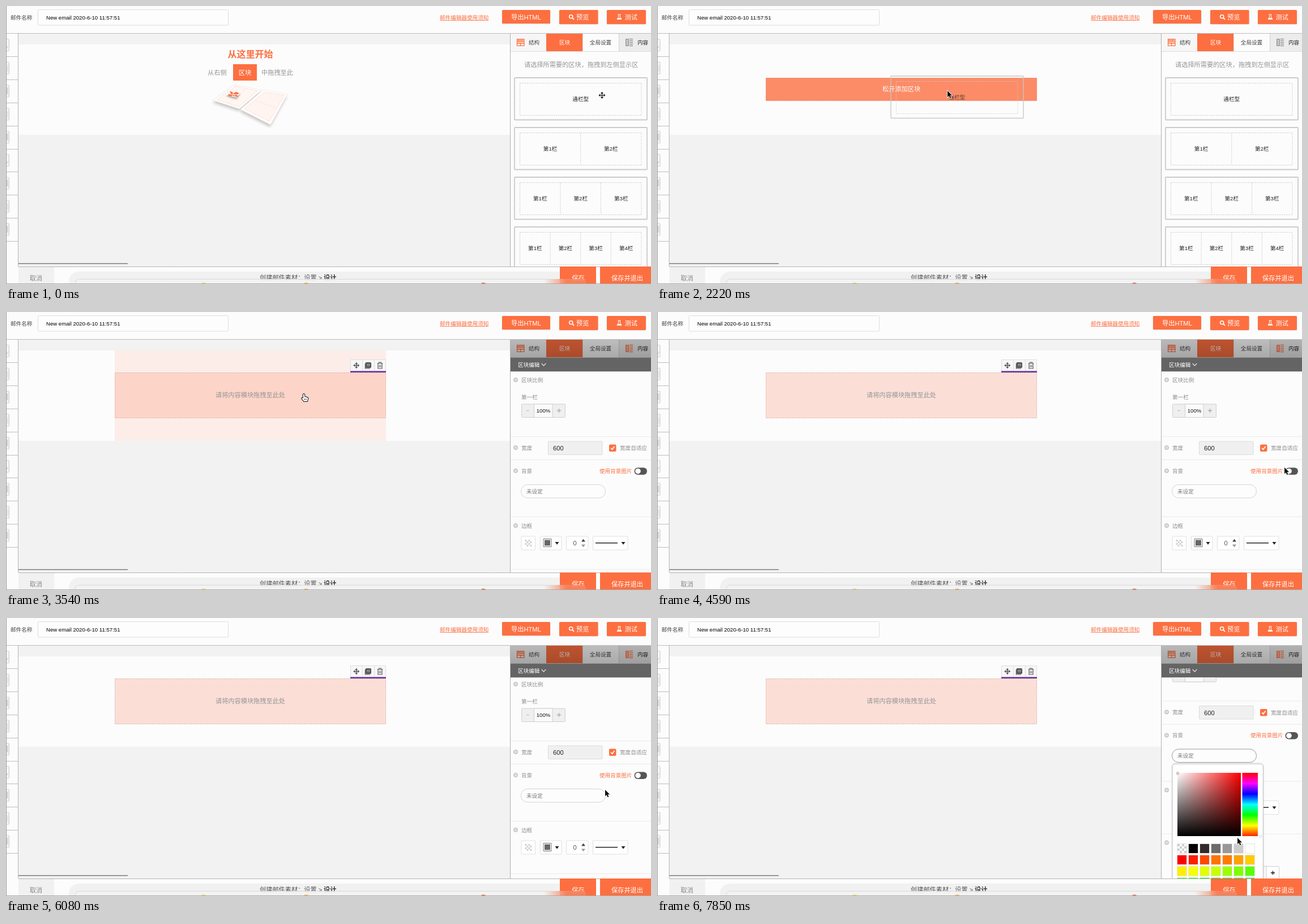
An HTML page with a canvas that plays this animation: 1139 px wide and 492 px high, repeating every 8 s.

```html
<!DOCTYPE html>
<html lang="zh-CN">
<head>
<meta charset="utf-8">
<title>邮件编辑器</title>
<style>
html, body { margin: 0; width: 100%; height: 100%; overflow: hidden; background: #f2f2f2; }
canvas { display: block; width: 1139px; height: 492px; }
</style>
</head>
<body>
<canvas id="stage" width="1139" height="492"></canvas>
<script>
const c = document.getElementById('stage').getContext('2d');
const LOOP = 8000, ORANGE = '#fd6f40', PAPER = '#fcfcfc', GREY = '#959595', FORM = '#8c8c8c';
const FONT = '"Liberation Sans", "Noto Sans CJK SC", "Noto Sans CJK", "Noto Sans CJK JP", sans-serif';

// ---- timing ----
// Number of picture changes passed out of n, spread evenly over a..b
const passed = (t, a, b, n) => Math.max(0, Math.min(n, Math.floor((t - a) / ((b - a) / (n - 1)) + 1e-6) + 1));

const MOVES = [
  { a: 140, b: 890, pts: [[1052, 158], [1042, 158], [1022, 159], [1000, 159], [980, 157], [967, 155], [962, 154]] },
  { a: 1180, b: 2220, pts: [[962, 154], [953, 156], [890, 159], [800, 160], [705, 160], [625, 157], [560, 153], [525, 151], [513, 150]] },
  { a: 2360, b: 2800, pts: [[513, 150], [516, 149], [521, 147], [525, 145], [526, 145]] },
  { a: 3990, b: 4890, pts: [[526, 145], [575, 160], [690, 185], [860, 215], [1000, 250], [1108, 275], [1085, 295], [1058, 304]] },
  { a: 7110, b: 7850, pts: [[1058, 304], [1040, 268], [1010, 245], [1010, 245], [1016, 300], [1023, 360], [1025, 389]] }
];

function pointer(t) {
  const m = MOVES.filter(m => t >= m.a).pop() || MOVES[0];
  return m.pts[passed(t, m.a, m.b, m.pts.length - 1)];
}

function scrollAt(t) {
  if (t < 5780) return [0, 8, 28, 39][passed(t, 5040, 5340, 3)];
  return [39, 27, 11, 3, 8, 25, 48, 67, 73.5][passed(t, 5780, 6820, 8)];
}

// ---- drawing helpers ----
function fill(x, y, w, h, color) { c.fillStyle = color; c.fillRect(x, y, w, h); }

function text(s, x, y, size, color, align = 'left', weight = 400) {
  c.font = `${weight} ${size}px ${FONT}`;
  c.textAlign = align;
  c.fillStyle = color;
  c.fillText(s, x, y + size * 0.37);
}

function line(x1, y1, x2, y2, color, w = 1, dash = []) {
  c.strokeStyle = color; c.lineWidth = w; c.setLineDash(dash);
  c.beginPath(); c.moveTo(x1, y1); c.lineTo(x2, y2); c.stroke();
  c.setLineDash([]);
}

function box(x, y, w, h, r, bg, border, lw = 1) {
  c.beginPath(); c.roundRect(x, y, w, h, r);
  if (bg) { c.fillStyle = bg; c.fill(); }
  if (border) { c.strokeStyle = border; c.lineWidth = lw; c.stroke(); }
}

function dashed(x, y, w, h, color) {
  c.setLineDash([2.4, 1.6]); box(x, y, w, h, 0, null, color); c.setLineDash([]);
}

function poly(pts, bg, border, lw = 1) {
  c.beginPath(); pts.forEach(p => c.lineTo(...p)); c.closePath();
  if (bg) { c.fillStyle = bg; c.fill(); }
  if (border) { c.strokeStyle = border; c.lineWidth = lw; c.stroke(); }
}

function shape(d, x, y, bg, border, lw = 1) {
  const p = new Path2D(d);
  c.save(); c.translate(x, y);
  if (border) { c.strokeStyle = border; c.lineWidth = lw; c.stroke(p); }
  if (bg) { c.fillStyle = bg; c.fill(p); }
  c.restore();
}

function caret(x, y, dir, color, s = 3.5) {
  poly([[x - s, y - dir * s * .6], [x + s, y - dir * s * .6], [x, y + dir * s * .8]], color);
}

function checker(x, y, s) {
  fill(x, y, s, s, '#fff');
  const q = s / 4;
  for (let i = 0; i < 16; i++) if ((i + (i >> 2)) % 2 === 0) fill(x + i % 4 * q, y + (i >> 2) * q, q, q, '#d0d0d0');
}

function clip(x, y, w, h, draw) {
  c.save(); c.beginPath(); c.rect(x, y, w, h); c.clip(); draw(); c.restore();
}

function moveIcon(x, y, s, color) {
  line(x - s, y, x + s, y, color, 1.4); line(x, y - s, x, y + s, color, 1.4);
  for (let i = 0; i < 4; i++) {
    c.save(); c.translate(x, y); c.rotate(i * Math.PI / 2);
    poly([[s + .4, 0], [s - 2.4, -2.5], [s - 2.4, 2.5]], color);
    c.restore();
  }
}

function ramp(x0, y0, x1, y1, colors) {
  const g = c.createLinearGradient(x0, y0, x1, y1);
  colors.forEach((color, i) => g.addColorStop(i / (colors.length - 1), color));
  return g;
}

// ---- page chrome ----
function button(x, y, w, h) {
  c.save();
  c.shadowColor = 'rgba(0,0,0,.14)'; c.shadowBlur = 2; c.shadowOffsetY = 1;
  box(x, y, w, h, 1.5, ORANGE);
  c.restore();
}

function topBar() {
  fill(0, 0, 1139, 48, PAPER);
  line(0, 48.5, 1139, 48.5, '#bdbdbd');
  text('邮件名称', 8, 20, 9.6, '#444');
  box(56.5, 6.5, 336, 27.5, 2, '#fdfdfd', '#dedede');
  text('New email 2020-6-10 11:57:51', 71, 20, 9.6, '#000');
  text('邮件编辑器使用须知', 766, 20, 9.6, ORANGE);
  line(766, 25.5, 852, 25.5, ORANGE, .8);
  button(876, 7, 85, 24); text('导出HTML', 918.5, 19.5, 11.2, '#fff', 'center', 500);
  button(977, 7, 68.5, 25); text('预览', 1007, 20, 11.2, '#fff', 'left', 500);
  c.beginPath(); c.arc(997.7, 18.7, 3, 0, 7); c.strokeStyle = '#fff'; c.lineWidth = 1.6; c.stroke();
  line(1000, 21, 1003, 24, '#fff', 1.8);
  button(1061, 7, 69, 25); text('测试', 1092.5, 20, 11.2, '#fff', 'left', 500);
  shape('M-1.3-4.5V-.5L-4 4H4L1.3-.5V-4.5M-2.5-4.5H2.5', 1083, 19.5, null, '#fff', 1);
  poly([[1081, 21], [1085, 21], [1087, 24], [1079, 24]], '#fff');
}

function sideStrip() {
  fill(0, 49, 21, 412, PAPER);
  for (let i = 0; i < 9; i++) {
    const y = 48.5 + i * 40.8;
    box(-6, y + 10, 11.5, 21, 1, '#f4f4f4', '#cfcfcf');
    if (i % 5 === 0) line(0, y + 27, 4, y + 22, '#bbb');
    else if (i % 2 === 0) fill(0, y + 14, 4, 12, '#d8d8d8');
    else line(3, y + 15, 3, y + 27, '#ccc');
    line(0, Math.round(y + 40.8) + .5, 21, Math.round(y + 40.8) + .5, '#bdbdbd');
  }
  line(21.5, 48, 21.5, 461, '#b5b5b5');
}

function bottomBar() {
  fill(0, 461, 1139, 31, PAPER);
  line(22, 461.5, 1139, 461.5, '#b5b5b5');
  fill(22, 462, 63, 30, '#f1f1f1');
  text('取消', 53, 481.5, 11.2, '#888', 'center');
  box(111, 470, 900, 50, 18, '#f1f1f1');
  text('创建邮件素材：设置 > ', 448, 481, 11.2, '#555');
  text('设计', 561, 481, 11.2, '#333', 'left', 700);
  fill(978, 461, 64, 31, ORANGE);
  text('保存', 1010.5, 481.5, 11.2, '#fff', 'center', 500);
  fill(1049, 461, 90, 31, ORANGE);
  text('保存并退出', 1097, 481.5, 11.2, '#fff', 'center', 500);
  clip(0, 483, 1139, 9, () => {
    box(122.5, 483.5, 901, 40, 6, ramp(950, 0, 990, 0, ['rgba(243,243,243,.9)', 'rgba(250,130,90,.85)']),
      ramp(970, 0, 985, 0, ['#d8d8d8', '#f28c68']));
    [[349, '#f5d44a'], [530, '#f3b23f'], [843, '#f2614f']].forEach(([x, color]) => {
      c.beginPath(); c.arc(x, 496.5, 7, 0, 7); c.fillStyle = color; c.fill();
    });
  });
  line(0, 491.5, 1139, 491.5, '#aaa');
}

// ---- work area ----
function startHint() {
  text('从这里开始', 431.5, 85.5, 16, ORANGE, 'center', 700);
  text('从右侧', 356, 117.5, 11.2, GREY);
  fill(401, 103, 42, 29, ORANGE);
  text('区块', 422, 117.5, 11.2, '#fff', 'center', 500);
  text('中拖拽至此', 451, 117.5, 11.2, GREY);

  const left = [[404, 139], [451, 149], [412, 182], [366, 167]];
  const right = [[455, 148], [497, 156], [467, 210], [414, 183]];
  c.save();
  c.shadowColor = 'rgba(0,0,0,.22)'; c.shadowBlur = 5; c.shadowOffsetX = -1; c.shadowOffsetY = 4;
  poly(left, '#fff'); poly(right, '#fff');
  c.restore();
  poly(left, '#fffdfc', '#f1e6e2', .7);
  poly(right, '#fffdfc', '#f1e6e2', .7);
  c.setLineDash([3, 2]);
  poly([[405, 142], [444, 150], [411, 178], [373, 166]], '#fff6f2', '#f3cfc2', .8);
  poly([[457, 152], [492, 158], [465, 204], [421, 182]], '#fff4ef', '#f3cfc2', .8);
  c.setLineDash([]);
  line(425, 146, 393, 172, '#fbe9e2');
  line(440, 167, 479, 181, '#fbe9e2');
  c.save();
  c.shadowColor = 'rgba(0,0,0,.3)'; c.shadowBlur = 3; c.shadowOffsetY = 3;
  poly([[397, 149], [414, 153], [407, 162], [389, 157]], '#fff');
  c.restore();
  poly([[395, 151], [400, 152], [402, 154], [406, 152], [412, 154], [408, 157], [410, 161], [403, 160], [400, 158], [397, 160], [391, 157], [397, 155]], ORANGE);
  line(400, 153, 405, 160, '#fff', 1); line(395, 156, 409, 157, '#fff', 1);
}

function dropBar() {
  fill(192, 127, 479, 41, '#fc8b67');
  dashed(192.5, 127.5, 478, 40, '#e9a184');
  text('松开添加区块', 431.5, 147, 11.2, '#fff', 'center');
}

function block(hover) {
  if (hover) fill(192, 68, 479, 160, '#fcede8');
  fill(192, 107, 479, 81, hover ? '#fdd4c8' : '#fbdfd7');
  dashed(192.5, 107.5, 478, 80, '#dcb9ac');
  text('请将内容模块拖拽至此处', 431.5, 147, 11.2, GREY, 'center');
}

function toolbar() {
  box(608.5, 84.5, 62, 20, 0, '#f7f7f7', '#dedede');
  line(629.5, 84, 629.5, 104, '#dedede'); line(650.5, 84, 650.5, 104, '#dedede');
  fill(608, 104.5, 63, 2.5, '#6a2fa8');
  moveIcon(618.7, 94.5, 5, '#555');
  shape('M-5.2-3.5V5H3.5', 639.5, 95, null, '#555', 1.1);
  box(635, 89.5, 9.5, 9, 1, '#555', '#555', 1);
  line(637, 92.5, 643, 92.5, '#ddd', .8); line(637, 95, 643, 95, '#ddd', .8);
  shape('M-5-3.5H5M-2-3.5V-5.5H2V-3.5M-3.6-3.5V5.5H3.6V-3.5M-1.3-1V3.5M1.3-1V3.5', 660.5, 94.5, null, '#555', 1.1);
}

function workArea(t, hover, [x]) {
  fill(22, 49, 868, 412, '#f2f2f2');
  fill(22, 68, 868, 160, PAPER);
  fill(22, 455, 193, 1.6, '#858585');
  if (t < 2360) t >= 1180 && x < 672 ? dropBar() : startHint();
  else block(hover);
  if (t >= 3400) toolbar();
}

// ---- right panel ----
function card(x, y, n, border = '#cbcbcb') {
  box(x + 1, y + 1, 234, 74.5, 1, null, border, 1.8);
  dashed(x + 10.5, y + 10.5, 214.5, 57, '#cfcfcf');
  const w = 214.5 / n;
  for (let i = 0; i < n; i++) {
    const left = x + 10.5 + i * w;
    if (i) line(left, y + 10.5, left, y + 67, '#cfcfcf', 1, [2.4, 1.6]);
    text(n > 1 ? `第${i + 1}栏` : '通栏型', left + w / 2, y + 38.5, 9.6, '#222', 'center');
  }
}

function tabs(editing) {
  fill(891, 49, 63, 32, '#f6f6f6');
  fill(954, 49, 64, 32, ORANGE);
  fill(1083, 49, 56, 32, '#ececec');
  line(1018.5, 49, 1018.5, 80, '#ddd'); line(1082.5, 49, 1082.5, 80, '#d0d0d0');
  text('结构', 923, 64.5, 9.6, '#444');
  text('区块', 986.5, 64.5, 9.6, '#fff', 'center');
  text('全局设置', 1050, 64.5, 9.6, '#444', 'center');
  text('内容', 1115, 64.5, 9.6, '#222');
  box(902.5, 58.5, 12.5, 12, 0, '#fde6dd', ORANGE, 1.2);
  fill(903, 59, 12, 3, '#fca789');
  fill(903, 62, 12, 1.2, ORANGE); fill(903, 65, 12, 1.4, ORANGE); fill(908, 66, 1.2, 5, ORANGE);
  const ink = editing ? ORANGE : '#8c8c8c';
  box(1094.5, 58.5, 5, 12, 0, editing ? '#fca789' : '#c4c4c4', ink);
  for (let i = 0; i < 5; i++) line(1101, 58.5 + i * 3, 1107, 58.5 + i * 3, ink, 1.3);
  line(891, 80.5, 1139, 80.5, '#ddd');
  if (editing) fill(891, 49, 248, 32, ramp(0, 49, 0, 81, ['rgba(0,0,0,.25)', 'rgba(0,0,0,.33)']));
}

function label(s, y) {
  c.beginPath(); c.arc(900, y, 3.5, 0, 7);
  c.fillStyle = '#dedede'; c.fill();
  c.strokeStyle = '#b5b5b5'; c.lineWidth = 1; c.stroke();
  text(s, 910, y + .3, 9.6, FORM);
}

function stepper(x, y, value, bg, ink) {
  box(x + .5, y + .5, 77, 23.5, 1, bg, '#d0d0d0');
  box(x + 22.5, y + .5, 32.5, 23.5, 0, '#fafafa', '#d0d0d0');
  text(value, x + 39, y + 11.5, 9.6, '#111', 'center');
  line(x + 9.5, y + 12, x + 13.5, y + 12, ink, 1.2);
  line(x + 63, y + 12, x + 70, y + 12, ink, 1.3); line(x + 66.5, y + 8.5, x + 66.5, y + 15.5, ink, 1.3);
}

function form(focus) {
  [220.5, 261.5, 362.5, 455.5].forEach(y => line(891, y, 1139, y, '#ebebeb'));
  label('区块比例', 120);
  text('第一栏', 910, 150, 9.6, FORM);
  stepper(910, 162.5, '100%', '#efefef', '#aaa');

  label('宽度', 240);
  box(957.5, 229, 95.5, 23.5, 1, '#f0f0f0', '#dcdcdc');
  text('600', 966, 241, 11.2, '#222');
  box(1065, 234.5, 12.5, 12.5, 2, ORANGE);
  shape('M-3 0L-.8 2.5L3.3-2.8', 1071.2, 240.8, null, '#fff', 1.7);
  text('宽度自适应', 1084, 240.5, 9.6, FORM);

  label('背景', 281);
  text('使用背景图片', 1048, 281.3, 9.6, ORANGE);
  box(1109.5, 275.5, 22.5, 12.5, 6.2, '#555');
  c.beginPath(); c.arc(1116, 281.7, 4.8, 0, 7); c.fillStyle = '#fff'; c.fill();
  box(909.5, 305.5, 149, 23.5, 11.7, '#fdfdfd', focus ? '#999' : '#d4d4d4');
  text('未设定', 919, 317, 9.6, '#777');

  label('边框', 378);
  box(910, 397, 24.5, 24, 1, '#fff', '#e0e0e0'); checker(916.5, 403, 12);
  box(943.5, 397, 37.5, 24, 1, '#fff', '#e0e0e0');
  box(949, 401.5, 14, 14, 0, '#fff', '#777'); fill(951, 403.5, 10, 10, '#666');
  caret(973, 409, 1, '#222');
  box(989.5, 397, 38.5, 24, 1, '#fff', '#e0e0e0');
  text('0', 1004.5, 409, 11.2, '#555', 'center');
  caret(1019.5, 404.5, -1, '#444'); caret(1019.5, 413.5, 1, '#999');
  box(1036.5, 397, 61.5, 24, 1, '#fff', '#e0e0e0');
  line(1041, 408.7, 1080, 408.7, '#222', 1.6);
  caret(1090, 409, 1, '#222');

  label('内间隔', 471);
  text('上', 910, 500, 9.6, FORM); text('下', 1021, 500, 9.6, FORM);
  stepper(910, 512.5, '0', '#fff', '#111'); stepper(1021, 512.5, '0', '#fff', '#111');
}

function picker() {
  c.save();
  c.shadowColor = 'rgba(0,0,0,.12)'; c.shadowBlur = 3;
  box(910, 258, 160.5, 240, 5, '#fff', '#c4c4c4');
  c.restore();
  fill(919, 274, 112, 112, ramp(919, 0, 1031, 0, ['#fff', '#f00']));
  fill(919, 274, 112, 112, ramp(0, 274, 0, 386, ['rgba(0,0,0,0)', '#000']));
  fill(1033.5, 274, 27.5, 112, ramp(0, 274, 0, 386, ['#f00', '#f0f', '#00f', '#0ff', '#0f0', '#ff0', '#f20']));
  c.beginPath(); c.arc(919.5, 275, 2.2, 0, 7); c.strokeStyle = '#aaa'; c.lineWidth = .9; c.stroke();
  line(916, 275, 923, 275, '#bbb', .7); line(919.5, 271.5, 919.5, 278.5, '#bbb', .7);
  box(1064, 384.5, 4, 3.5, 1, '#fff', '#ccc', .8);
  const hues = [0, 7, 17, 27, 29, 38, 48, 56, 62, 67, 73, 84, 90, 99, 106, 112, 118, 124, 130, 136, 142];
  const greys = ['', '#000', '#342a2a', '#6c6c6c', '#999', '#ccc', '#fff'];
  for (let i = 0; i < 28; i++) {
    const x = 919 + i % 7 * 20, y = 400 + Math.floor(i / 7) * 20;
    if (i) fill(x, y, 16, 16, i < 7 ? greys[i] : `hsl(${hues[i - 7]},100%,50%)`);
    else checker(x, y, 16);
    box(x - .5, y - .5, 17, 17, 0, null, '#ddd', .8);
  }
}

function editor(t) {
  const opened = passed(t, 7110, 7850, 6) >= 3, scroll = scrollAt(t);
  tabs(true);
  fill(891, 81, 248, 24.5, '#646464');
  text('区块编辑', 904, 93, 9.6, '#fff', 'left', 500);
  shape('M-3.8-2L0 2L3.8-2', 949.5, 93, null, '#ddd', 1.3);
  fill(891, 105.5, 248, 356, PAPER);
  clip(891, 105.5, 248, 355.5, () => {
    c.save(); c.translate(0, -scroll); form(opened); c.restore();
    if (opened) picker();
  });
}

function panel(t) {
  fill(890, 49, 249, 412, PAPER);
  if (t < 3540) {
    tabs(false);
    text('请选择所需要的区块，拖拽到左侧显示区', 915, 103.5, 11.2, GREY);
    clip(891, 81, 248, 380, () => {
      for (let n = 1; n <= 4; n++) card(897, 38 + n * 88, n);
    });
  }
  if (t >= 3400) {
    c.save();
    c.globalAlpha = t < 3540 ? .6 : 1;
    editor(t);
    c.restore();
  }
  line(890.5, 49, 890.5, 461, '#b0b0b0');
}

// ---- pointer ----
function cursor(t, hover, [x, y]) {
  const step = passed(t, 7110, 7850, 6);
  if (t < 1180) {
    c.save(); c.shadowColor = '#fff'; c.shadowBlur = 2;
    moveIcon(x + .5, y, 5.5, '#111');
    c.restore();
  } else if (hover) {
    shape('M-1.2 1Q0-.8 1.2 1V5L5.6 6Q7.4 6.4 7.2 8L6.6 10.8 5.8 13H.2L-3.6 8.6Q-4 7-2.8 6.8L-1.2 8Z', x, y, '#fff', '#111', 2);
    line(x + 1.5, y + 8, x + 1.5, y + 11, '#111', .8); line(x + 4, y + 8, x + 4, y + 11, '#111', .8);
  } else if (step === 2 || step === 3) {
    shape('M-2.5-7Q0-7 0-5Q0-7 2.5-7M0-5V5M-2.5 7Q0 7 0 5Q0 7 2.5 7', x, y, null, '#222', 1.1);
  } else {
    shape('M0 0V11.4L2.6 9L4.5 13.2L6.4 12.3L4.6 8.3H8.2Z', x, y, '#111', '#fff', 1.6);
  }
}

function draw(t) {
  const pos = pointer(t);
  const hover = t >= 2360 && t < 4890 && pos[0] < 671;
  workArea(t, hover, pos);
  topBar();
  sideStrip();
  panel(t);
  bottomBar();
  line(.5, 0, .5, 492, '#999');
  if (t >= 1180 && t < 2360) {
    c.save();
    c.globalAlpha = .75;
    card(pos[0] - 101, pos[1] - 27, 1, '#c4c9c8');
    c.restore();
  }
  cursor(t, hover, pos);
}

const began = performance.now();
function tick() {
  draw((performance.now() - began) % LOOP);
  requestAnimationFrame(tick);
}
tick();
</script>
</body>
</html>
```
